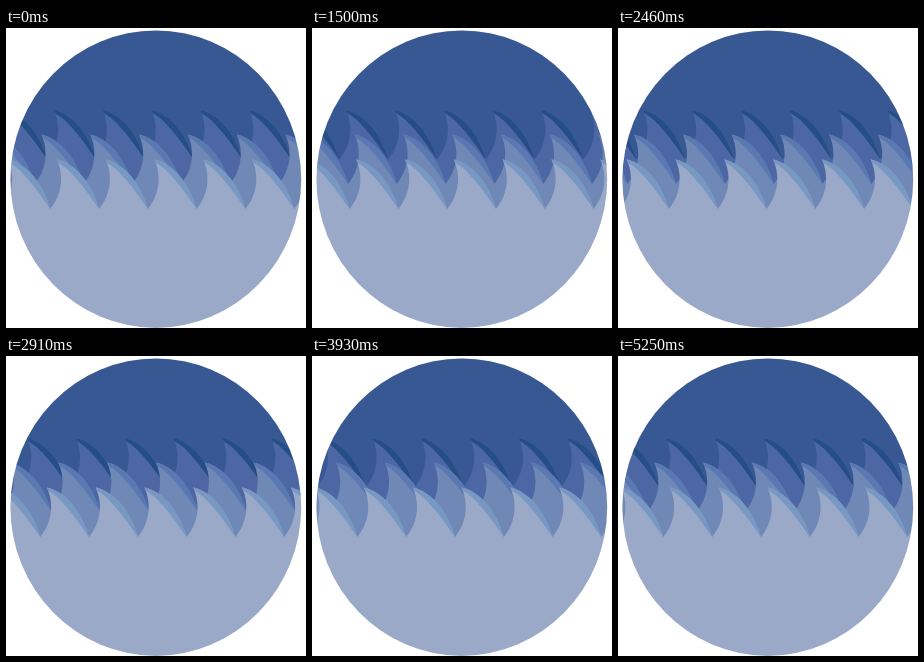
Write an HTML page with a canvas that moves like this. It is 300 by 300 pixels and loops after 5280 ms.

```html
<!DOCTYPE html>
<html>
<head>
<meta charset="utf-8">
<style>
  html, body { margin: 0; width: 100%; height: 100%; overflow: hidden; background: #fff; }
  canvas { display: block; }
</style>
</head>
<body>
<canvas id="stage" width="300" height="300"></canvas>
<script>
const ctx = document.getElementById('stage').getContext('2d');
const LOOP = 5280, PERIOD = 48.8;

// Each layer drifts left by a whole number of wave lengths per loop.
const layers = [
  { top: 82, x: 48, turns: 1, body: '#4c67a3', rim: '#254e86' },
  { top: 106.5, x: 35.5, turns: 3, body: '#7088b5', rim: '#5a79b3' },
  { top: 131.5, x: 51, turns: 4, body: '#9ba9c9', rim: '#7698c2' }
];

// Outer edge of a fin, from its tip down to the foot of the next one.
function outer(x, y) {
  ctx.bezierCurveTo(x + 20, y + 5, x + 35, y + 25, x + 42, y + 49.5);
}

// Inner edge of the next fin, from the foot up to its tip.
function inner(x, y) {
  ctx.bezierCurveTo(x + 53, y + 36, x + 56.5, y + 18, x + PERIOD, y);
}

function drawLayer({ top, x, turns, body, rim }, p) {
  const start = (x - p * turns * PERIOD) % PERIOD - 2 * PERIOD;
  ctx.beginPath();
  ctx.moveTo(start, 301);
  ctx.lineTo(start, top);
  let wave = start;
  for (; wave < 310; wave += PERIOD) {
    outer(wave, top);
    inner(wave, top);
  }
  ctx.lineTo(wave, 301);
  ctx.fillStyle = body;
  ctx.fill();

  ctx.fillStyle = rim;
  for (wave = start; wave < 310; wave += PERIOD) {
    ctx.beginPath();
    ctx.moveTo(wave, top);
    outer(wave, top);
    ctx.bezierCurveTo(wave + 28, top + 29, wave + 14, top + 10, wave + 1, top + 3);
    ctx.fill();
  }
}

function draw() {
  const p = performance.now() % LOOP / LOOP;
  ctx.globalCompositeOperation = 'source-over';
  ctx.fillStyle = '#385894';
  ctx.fillRect(0, 0, 300, 300);
  layers.forEach(layer => drawLayer(layer, p));

  // Keep only the round window.
  ctx.globalCompositeOperation = 'destination-in';
  ctx.beginPath();
  ctx.ellipse(149.8, 151.2, 145.4, 148.7, 0, 0, 2 * Math.PI);
  ctx.fill();
  requestAnimationFrame(draw);
}
draw();
</script>
</body>
</html>
```
